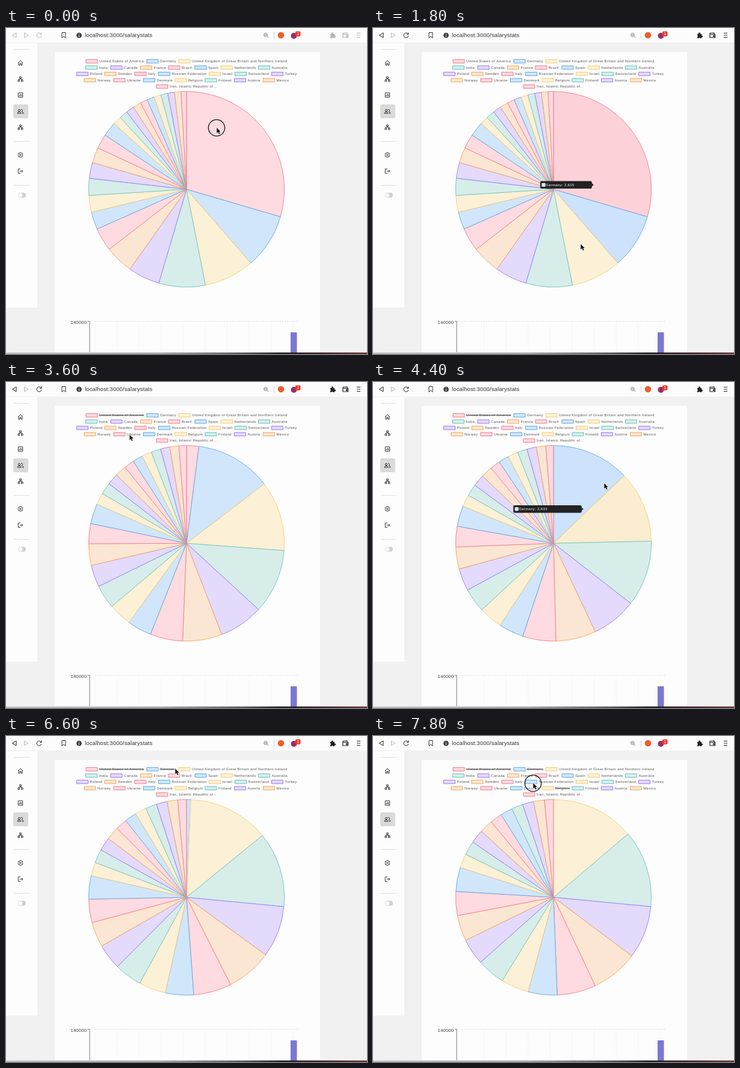
An HTML page with a canvas for the animation above (8 s loop, 600x542 px).

```html
<!DOCTYPE html>
<html lang="en">
<head>
<meta charset="utf-8">
<title>Salary stats</title>
<style>
  html, body { margin: 0; width: 100%; height: 100%; overflow: hidden; background: #f1f1f2; }
  canvas { display: block; }
</style>
</head>
<body>
<canvas id="stage" width="600" height="542"></canvas>
<script>
const ctx = document.getElementById('stage').getContext('2d');
const LOOP = 8000, STEP = 200;
const FONT = '"Liberation Sans", Arial, sans-serif';
const CENTER = { x: 300, y: 268.2 }, RADIUS = 163;

// fill, hovered fill, border; slices cycle through these
const PALETTE = [
  ['#fddbe0', '#fcd2d8', '#f5788f'],
  ['#d1e6fa', '#cde2fb', '#5aaaea'],
  ['#fcf0d7', '#fbedcf', '#f4cf72'],
  ['#d7edea', '#cdeae6', '#68c3bf'],
  ['#e4dafb', '#dccffb', '#9c78f6'],
  ['#fbe6d3', '#fbdfc6', '#f5a758'],
];

// each row: baseline centre, then [name, box x, slice in degrees]
const LEGEND_ROWS = [
  [55.2, ['United States of America', 132.5, 106.3], ['Germany', 233.5, 32.6],
    ['United Kingdom of Great Britain and Northern Ireland', 286.5, 29.9]],
  [65.7, ['India', 132, 27.6], ['Canada', 173.5, 18.9], ['France', 223, 16.8], ['Brazil', 269.5, 13.9],
    ['Spain', 313.5, 10.4], ['Netherlands', 357, 9.9], ['Australia', 419, 10.1]],
  [76.2, ['Poland', 117, 9.4], ['Sweden', 163.5, 9.2], ['Italy', 213.5, 8.6], ['Russian Federation', 253, 8.6],
    ['Israel', 337, 5], ['Switzerland', 380, 5], ['Turkey', 441, 4.9]],
  [86.7, ['Norway', 129.5, 4.8], ['Ukraine', 178.5, 4.3], ['Denmark', 228, 4.35], ['Belgium', 280.5, 4.2],
    ['Finland', 330.5, 4.1], ['Austria', 379, 3.95], ['Mexico', 427, 3.9]],
  [97.2, ['Iran, Islamic Republic of...', 249.5, 3.2]],
];
const countries = LEGEND_ROWS.flatMap(([y, ...items]) =>
  items.map(([name, x, size]) => ({ name, x, y, size })));
countries.forEach((c, i) => {
  c.colors = PALETTE[i % 6];
  c.label = c.name + ': ' + Math.round(c.size * 2615 / 32.6).toLocaleString('en-US');
});

const TOGGLES = [[3112, 0], [6080, 1], [7000, 20]];           // [time, country]
const HOVERS = [[0, -1], [200, 0], [1745, 1], [1850, 2], [2450, -1], [4000, 2], [4320, 1], [5400, -1]];
const CLICK_RINGS = [0, 3000, 6000, 7000, 7800];
const CURSOR = [
  [0, 350, 165.5], [800, 350, 165.5], [1500, 372, 262], [1800, 345, 359], [2200, 330, 350],
  [2900, 147, 55.5], [3400, 147, 55.5], [4100, 440, 215], [4400, 384, 168], [5100, 372, 175],
  [5800, 237, 53], [6200, 237, 53], [6600, 281, 54], [6900, 316, 84], [7100, 316, 84],
  [7700, 266, 78], [8000, 266, 78],
];

const lerp = (a, b, p) => a + (b - a) * p;
const easeOut = p => 1 - (1 - Math.min(1, Math.max(0, p))) ** 4;

function sliceEnds(hidden) {
  const total = countries.reduce((sum, c, i) => sum + (hidden.has(i) ? 0 : c.size), 0);
  let sum = 0;
  return countries.map((c, i) => (sum += hidden.has(i) ? 0 : c.size) / total * 2 * Math.PI);
}

function pieAt(t) {
  const hidden = new Set();
  let ends = sliceEnds(hidden);
  for (const [time, index] of TOGGLES) {
    if (t < time) break;
    hidden.add(index);
    const next = sliceEnds(hidden), p = easeOut((t - time) / 1000);
    ends = ends.map((end, i) => lerp(end, next[i], p));
  }
  return { ends, hidden };
}

function cursorAt(t) {
  const i = CURSOR.findIndex(k => k[0] > t);
  const [t0, x0, y0] = CURSOR[i - 1], [t1, x1, y1] = CURSOR[i];
  let p = (t - t0) / (t1 - t0);
  p = p * p * (3 - 2 * p);
  return [lerp(x0, x1, p), lerp(y0, y1, p)];
}

function rect(x, y, w, h, fill, r = 0) {
  ctx.fillStyle = fill;
  ctx.beginPath();
  ctx.roundRect(x, y, w, h, r);
  ctx.fill();
}

function dot(x, y, r, fill) {
  ctx.fillStyle = fill;
  ctx.beginPath();
  ctx.arc(x, y, r, 0, 2 * Math.PI);
  ctx.fill();
}

function text(str, x, y, size, color, spacing = 0, weight = '') {
  ctx.font = `${weight} ${size}px ${FONT}`;
  ctx.letterSpacing = spacing + 'px';
  ctx.textBaseline = 'middle';
  ctx.fillStyle = color;
  ctx.fillText(str, x, y);
}

// draws an SVG path centred on x, y
function icon(x, y, d, color, { width = 1, fill = false } = {}) {
  ctx.save();
  ctx.translate(x, y);
  ctx.lineWidth = width;
  ctx.strokeStyle = ctx.fillStyle = color;
  ctx.lineJoin = 'round';
  if (fill) ctx.fill(new Path2D(d)); else ctx.stroke(new Path2D(d));
  ctx.restore();
}

function line(x0, y0, x1, y1, color, width = 1, dash = []) {
  ctx.strokeStyle = color;
  ctx.lineWidth = width;
  ctx.setLineDash(dash);
  ctx.beginPath();
  ctx.moveTo(x0, y0);
  ctx.lineTo(x1, y1);
  ctx.stroke();
  ctx.setLineDash([]);
}

function drawToolbar(focused) {
  const ink = focused ? '#222' : '#b4b4b4';
  rect(0, 0, 600, 24, '#fcfcfc');
  icon(14, 12, 'M3-4L-3.5 0L3 4Z', ink);
  icon(33.5, 12, 'M-3-4L3.5 0L-3 4Z', '#bbb');
  icon(55, 12, 'M3.5-2A4 4 0 1 0 4 1M4-4.5V-1.5H1', ink);
  icon(96, 12, 'M-3-4.5H3V4.5L0 2L-3 4.5Z', '#333');
  dot(121.5, 12.2, 4.4, '#444');
  line(121.5, 11.8, 121.5, 14.6, '#fff');
  line(121.5, 9.5, 121.5, 10.5, '#fff');
  text('localhost:3000/salarystats', 131, 12.8, 9.5, '#333', .12);
  icon(432, 12, 'M2.3-.5A2.8 2.8 0 1 1-3.3-.5A2.8 2.8 0 1 1 2.3-.5M1.6 1.6L4 4M-2-.5H1', '#666', { width: .9 });
  line(445.5, 7, 445.5, 18, '#d5d5d5');
  dot(457, 12, 5.3, '#f4592b');
  dot(478.5, 13, 5, '#9b2c68');
  rect(481, 5.5, 8.5, 8.5, '#ee3a2d', 2);
  text('1', 483.8, 10, 6.5, '#fff');
  icon(543, 12.5, 'M-4-2.5H-2A1.7 1.7 0 1 1 1-2.5H3V0A1.6 1.6 0 1 1 3 3V4.5H.8A1.5 1.5 0 0 0-2 4.5H-4V2.5A1.5 1.5 0 0 0-4-.3Z', ink, { fill: true });
  icon(564, 12, 'M-4-2.5V4H4.5V-1.5H-4V-3.5L3-4V-1.5M4.5 .3H1.5V2.3H4.5', ink, { width: 1.2 });
  icon(586, 12, 'M-3-3.5H3M-3 0H3M-3 3.5H3', ink, { width: 1.2 });
}

function drawSidebar() {
  const tree = 'M-1.3-4H1.3V-1.6H-1.3ZM-4 1.6H-1.6V4H-4ZM1.6 1.6H4V4H1.6ZM0-1.6V0M-2.8 1.6V0H2.8V1.6';
  const ink = '#333';
  rect(0, 25, 52, 440, '#fdfdfd');
  for (const y of [35.5, 188.5, 261.5]) line(13, y, 39, y, '#dfdfdf');
  rect(12, 127, 25, 23, '#dadada', 3);
  icon(24, 58, 'M-4 0L0-4L4 0M-3-1V4H-1V1H1V4H3V-1', ink);
  icon(24, 85, tree, ink);
  icon(24, 111.5, 'M-3.7-3.7H3.7V3.7H-3.7ZM-1.8 2V0M0 2V-2M1.8 2V-1', ink);
  icon(24, 138.5, 'M-.3-1.4A1.7 1.7 0 1 1-3.7-1.4A1.7 1.7 0 1 1-.3-1.4M-5 3.5C-5 .3 1 .3 1 3.5ZM1-3A1.7 1.7 0 1 1 1.8 .2M2.5 1Q5 1.3 5 3.5H2.5', ink);
  icon(24, 165, tree, ink);
  icon(24, 211, 'M-1-4H1L1.5-2.7L3.2-3L4-1.3L3 0L4 1.3L3.2 3L1.5 2.7L1 4H-1L-1.5 2.7L-3.2 3L-4 1.3L-3 0L-4-1.3L-3.2-3L-1.5-2.7ZM1.3 0A1.3 1.3 0 1 1-1.3 0A1.3 1.3 0 1 1 1.3 0', ink, { width: .9 });
  icon(24, 238, 'M0-3.7H-3.7V3.7H0M-1.5 0H4M2-2L4 0L2 2', ink);
  rect(20, 274, 13, 8, '#cfcfcf', 4);
  dot(24, 278, 3.3, '#fff');
}

function drawBarChart() {
  line(139, 487.5, 487, 487.5, '#dcdcdc', 1, [2, 2]);
  for (let x = 148; x < 487; x += 36.6) line(x, 488, x, 539, '#f0f0f0', 1, [2, 2]);
  line(139, 487, 139, 539, '#8c8c8c', 1.2);
  line(135.5, 487.5, 139, 487.5, '#8c8c8c');
  text('140000', 107.5, 489.5, 7.8, '#444', .1);
  rect(473, 506, 10.5, 34, '#7b77d3');
}

function drawLegend(hidden) {
  countries.forEach(({ name, x, y, colors }, i) => {
    rect(x, y - 3, 19.5, 6, colors[0]);
    ctx.strokeStyle = colors[2];
    ctx.lineWidth = 1;
    ctx.strokeRect(x + .5, y - 2.8, 19, 5.8);
    text(name, x + 22.5, y + .3, 6, '#555', .33);
    if (hidden.has(i)) line(x + 22, y, x + 22.5 + ctx.measureText(name).width, y, '#444', 1);
  });
}

function drawPie(ends, isHovered) {
  countries.forEach(({ colors }, i) => {
    const start = i ? ends[i - 1] : 0;
    if (ends[i] - start < .001) return;
    ctx.beginPath();
    ctx.moveTo(CENTER.x, CENTER.y);
    ctx.arc(CENTER.x, CENTER.y, RADIUS - .4, start - Math.PI / 2, ends[i] - Math.PI / 2);
    ctx.closePath();
    ctx.fillStyle = colors[isHovered(i) ? 1 : 0];
    ctx.fill();
    ctx.strokeStyle = colors[2];
    ctx.lineWidth = .9;
    ctx.lineJoin = 'bevel';
    ctx.stroke();
  });
}

function tooltipBox(index, ends) {
  const mid = ((index ? ends[index - 1] : 0) + ends[index]) / 2;
  ctx.font = `6px ${FONT}`;
  ctx.letterSpacing = '.33px';
  return {
    x: CENTER.x + Math.sin(mid) * RADIUS / 2,
    y: CENTER.y - Math.cos(mid) * RADIUS / 2,
    w: ctx.measureText(countries[index].label).width + 12,
  };
}

function drawTooltip(index, previous, age, ends) {
  const to = tooltipBox(index, ends);
  const from = previous < 0 ? to : tooltipBox(previous, ends);
  const p = easeOut(age / 400);
  const x = lerp(from.x, to.x, p), y = lerp(from.y, to.y, p), w = lerp(from.w, to.w, p);
  const left = x - 3 - w;
  rect(left, y - 6.3, w, 12.6, '#222', 2.5);
  icon(x, y, 'M0 0L-3.5-3V3Z', '#222', { fill: true });
  rect(left + 2.5, y - 3, 6, 6, '#fff');
  rect(left + 3.2, y - 2.3, 4.6, 4.6, countries[index].colors[0]);
  text(countries[index].label, left + 9, y + .3, 6, '#fff', .33);
}

function drawCursor(x, y, ring) {
  if (ring) {
    ctx.strokeStyle = '#111';
    ctx.lineWidth = 1.3;
    ctx.beginPath();
    ctx.arc(x, y + .5, 13.6, 0, 2 * Math.PI);
    ctx.stroke();
  }
  const arrow = 'M.3 .3V9.5L2.4 7.6L4 11L5.6 10.3L4.1 7H6.8Z';
  icon(x, y, arrow, '#fff', { width: 1.4 });
  icon(x, y, arrow, '#111', { fill: true });
}

function drawBottomEdge() {
  const g = ctx.createLinearGradient(0, 0, 600, 0);
  [[0, '#c2c2c4'], [.42, '#a8a8aa'], [.66, '#555'], [.76, '#1c1a1c'], [.87, '#3d2026'], [1, '#6b3434']]
    .forEach(([at, color]) => g.addColorStop(at, color));
  rect(0, 539.5, 600, 2.5, g);
}

function draw(t) {
  const { ends, hidden } = pieAt(t);
  const h = HOVERS.findLastIndex(([time]) => time <= t);
  const [since, hovered] = HOVERS[h];
  const previous = h ? HOVERS[h - 1][1] : -1;
  const age = t - since;

  rect(0, 0, 600, 542, '#f1f1f2');
  drawToolbar(t >= 200);
  drawSidebar();
  rect(81, 40, 441, 502, '#fdfdfd');
  drawBarChart();
  drawLegend(hidden);
  drawPie(ends, i => i === hovered || (i === previous && age < 150));
  if (hovered >= 0) drawTooltip(hovered, previous, age, ends);
  drawBottomEdge();
  drawCursor(...cursorAt(t), CLICK_RINGS.includes(t));
}

function frame(now) {
  draw(Math.floor((now % LOOP) / STEP) * STEP);
  requestAnimationFrame(frame);
}
requestAnimationFrame(frame);
</script>
</body>
</html>
```
